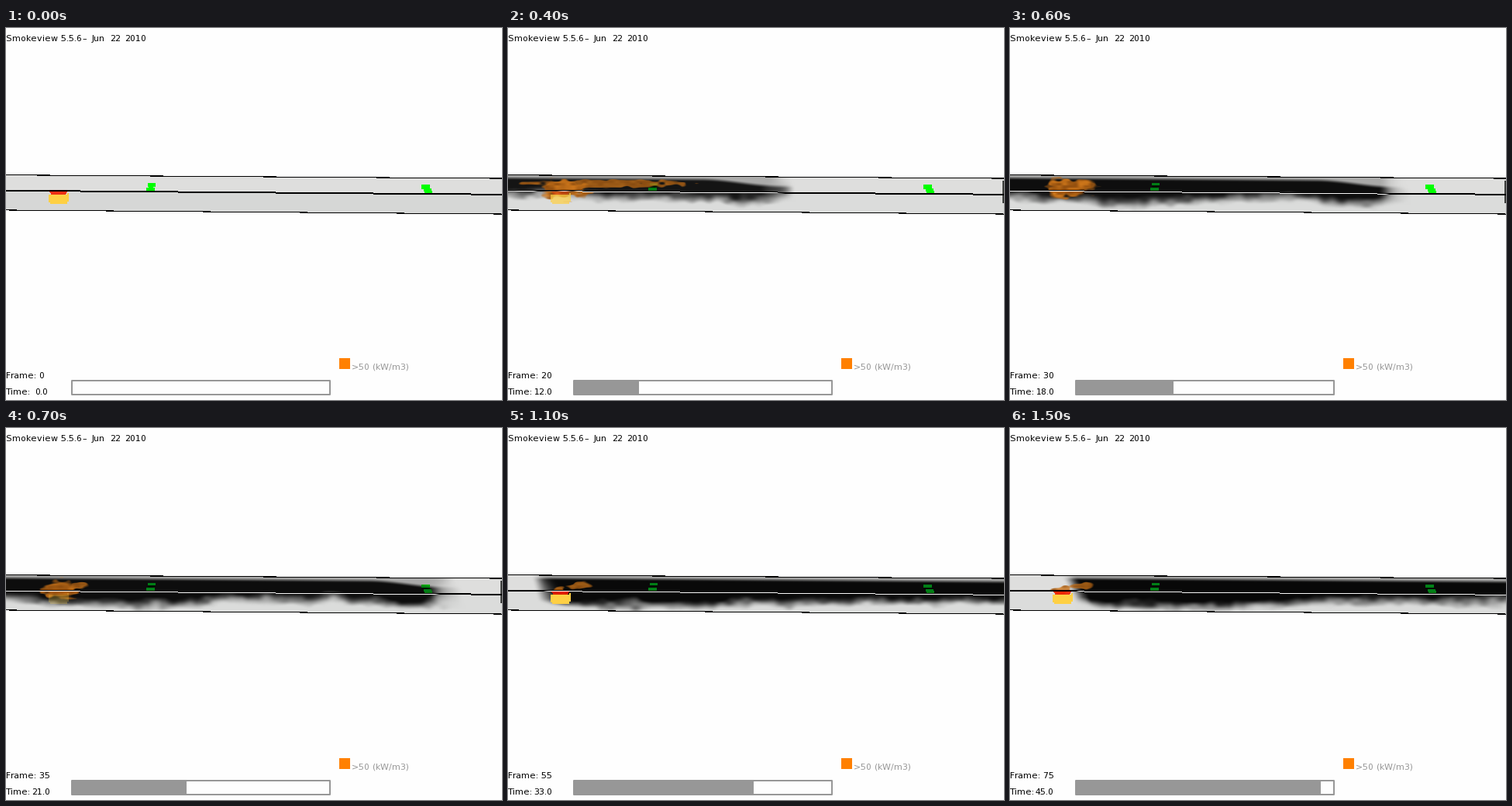
Animation, 640 px wide and 480 px high, one loop 1600 ms. Source, as a matplotlib script:

```python
import numpy as np
import matplotlib as mpl
import matplotlib.pyplot as plt
from matplotlib.animation import FuncAnimation
from matplotlib.patches import Rectangle

mpl.rcParams["text.hinting_factor"] = 1
W, H, DPI = 640, 480, 100
FRAMES, INTERVAL = 16, 100
TOP, BOTTOM = 186, 243
PAPER = 254 / 255
GREY = "#979797"

COLS = np.arange(W)
X, Y = np.meshgrid(COLS, np.arange(TOP, BOTTOM))
DEPTH = Y - (189 + X * 5 / W)
LATTICE = np.random.default_rng(7).random((64, 64))


def smooth(t):
    t = np.clip(t, 0, 1)
    return t * t * (3 - 2 * t)


def bump(t, center, width):
    return np.exp(-((t - center) / width) ** 2)


def noise(x, y):
    """Smooth value noise between 0 and 1."""
    ix, iy = np.floor(x).astype(int), np.floor(y).astype(int)
    u, v = smooth(x - ix), smooth(y - iy)

    def at(dx, dy):
        return LATTICE[(ix + dx) % 64, (iy + dy) % 64]

    near = at(0, 0) * (1 - u) + at(1, 0) * u
    far = at(0, 1) * (1 - u) + at(1, 1) * u
    return near * (1 - v) + far * v


def stairs(start, run, shift):
    """Row of a nearly level line that drops one pixel per run."""
    return start + (COLS + shift) // run


MIDDLE = stairs(209, 126, 30)
ROOF, ROOF_2 = stairs(189, 146, 89), stairs(189, 146, 106)
FLOOR, FLOOR_2 = stairs(234, 125, 111), stairs(234, 125, 121)
INSIDE = (Y >= ROOF) & (Y <= FLOOR)


def box(x0, y0, x1, y1):
    return (X >= x0) & (X < x1) & (Y >= y0) & (Y < y1)


SIGNS = (box(183, 200, 193, 205) | box(184, 205, 190, 207) | box(181, 206, 192, 211)
         | box(536, 202, 547, 208) | box(539, 207, 549, 211) | box(540, 210, 550, 214))
SLITS = box(181, 203, 194, 206) | box(536, 206, 551, 208)
CAR_TOP = (Y >= 210) & (Y < 215) & (X >= 55 + (Y - 210) * .7) & (X < 79 - (Y - 210) * .6)
CAR = box(55, 215, 79, 225) | box(57, 225, 79, 227) | box(79, 213, 81, 224)


def blend(img, color, alpha):
    alpha = np.asarray(alpha, float)[..., None]
    img[:] = img * (1 - alpha) + np.asarray(color) / 255 * alpha


def front(i):
    return 60 + 72.5 * i


def smoke(i):
    if i == 0:
        return np.zeros(X.shape)
    drift = X - 40 * i
    rough = noise(drift / 28, Y / 14 + 2.3 * i) - .5
    fine = noise(drift / 11 + 30, Y / 7 + 1.7 * i) - .5

    # The layer thickens with time, most of all downwind of the fire and at the front
    grown = smooth(i / 8)
    edge = (18 + grown * (10 + 10 * bump(X, 150, 20 * i))
            + 7 * bump(X, front(i) - 55, 50) + 8 * rough + 4 * fine)
    alpha = smooth((edge + 9 - DEPTH) / 18)

    ceiling = 1 + 8 * smooth((X - front(i) + 100) / 100)
    alpha *= .25 + .75 * smooth((DEPTH - ceiling) / 6)
    alpha *= smooth((front(i) + 24 * rough - X) / 44 + .5)

    # Fresh air later pushes the smoke away from the left end
    back = -40 + 120 * smooth((i - 7) / 6)
    soft = 30 + 50 * bump(i, 9, 1.5)
    alpha *= smooth((X - back - .4 * (DEPTH - 15) + 24 * rough) / soft + .5)
    return alpha * (1 - .3 / i)


def flame(i, cx, cy, rx, ry):
    rough = noise(X / 9 + 5 * i, Y / 4 + 3 * i) - .5
    r = np.hypot((X - cx) / rx, (Y - cy) / ry)
    return smooth((1.1 - r - .8 * rough) / .4)


def fire(i):
    burst = bump(i, 5.2, 2.2)
    spread = bump(i, 3.7, 1.2)
    flicker = 1 + .35 * np.sin(2.1 * i)
    core = flame(i, 66 + 9 * burst, 209 - 3 * burst,
                 11 * flicker + 22 * burst, 6 * flicker + 7 * burst)
    plume = flame(i, 92 + 33 * spread, 203 - 3 * spread, 13 + 90 * spread, 5)
    return np.maximum(core * (.75 + .2 * burst), plume * .7)


def tunnel(i):
    img = np.full(X.shape + (3,), PAPER)
    blend(img, (222, 222, 221), INSIDE & (Y <= MIDDLE))
    blend(img, (214, 215, 214) if i == 0 else (219, 220, 219), INSIDE & (Y > MIDDLE))
    blend(img, (0, 255, 0), SIGNS)

    dark = smoke(i) * INSIDE
    blend(img, (4, 4, 4), dark)
    blend(img, (0, 170, 30), SIGNS * ~SLITS * .75 * dark)
    if i:
        heat = fire(i) * INSIDE
        shade = noise(X / 7 + 3 * i, Y / 3 + 2 * i)
        blend(img, (226, 130, 28), heat)
        blend(img, (110, 55, 8), heat * .75 * shade)

    seen = 1 - bump(i, 6, 1.8)
    blend(img, (255, 208, 68), CAR * seen)
    blend(img, (240, 30, 0), CAR_TOP * seen ** 3 * .9)
    if 0 < i and front(i) < W:
        blend(img, (60, 62, 60), box(638, 197, 640, 226))

    blend(img, (0, 0, 0), Y == MIDDLE)
    white = smooth((dark - .35) / .4)
    below = Y == MIDDLE + 1
    blend(img, (0, 0, 0), below * (1 - white))
    blend(img, (250, 250, 250), below * white)
    for line in (ROOF, ROOF_2, FLOOR, FLOOR_2):
        blend(img, (0, 0, 0), Y == line)
    return np.clip(img, 0, 1)


fig = plt.figure(figsize=(W / DPI, H / DPI), dpi=DPI, facecolor=(PAPER,) * 3)
ax = fig.add_axes([0, 0, 1, 1])
ax.axis("off")


def label(x, y, text, color="black"):
    return ax.text(x, y, text, color=color, family="DejaVu Sans",
                   size=11 * 72 / DPI, va="baseline", ha="left")


view = ax.imshow(tunnel(0), extent=(0, W, BOTTOM, TOP), interpolation="nearest",
                 aspect="auto")
ax.set_xlim(0, W)
ax.set_ylim(H, 0)

for x, word in ((0, "Smokeview 5.5.6"), (98, "\u2013"), (111, "Jun"),
                (134, "22"), (153, "2010")):
    label(x, 17, word)
label(446, 440, ">50 (kW/m3)", GREY)
label(0, 473, "Time:")
counter = label(0, 452, "")
clock = label(37, 473, "")

ax.add_patch(Rectangle((430, 426), 14, 14, fc="#ff8000", ec="none"))
bar = ax.add_patch(Rectangle((85, 455), 0, 18, fc=GREY, ec="none"))
ax.add_patch(Rectangle((85, 455), 333, 18, fill=False, ec=GREY, lw=2 * 72 / DPI,
                       joinstyle="round"))


def update(i):
    step, seconds = 5 * i, 3.0 * i
    view.set_data(tunnel(i))
    counter.set_text(f"Frame: {step}")
    clock.set_text(f"{seconds:.1f}")
    clock.set_x(37 if seconds < 10 else 33)
    bar.set_width(round(333 * step / 79))
    return view, counter, clock, bar


anim = FuncAnimation(fig, update, frames=FRAMES, interval=INTERVAL,
                     repeat=True, repeat_delay=0, blit=False)
plt.show()
```
